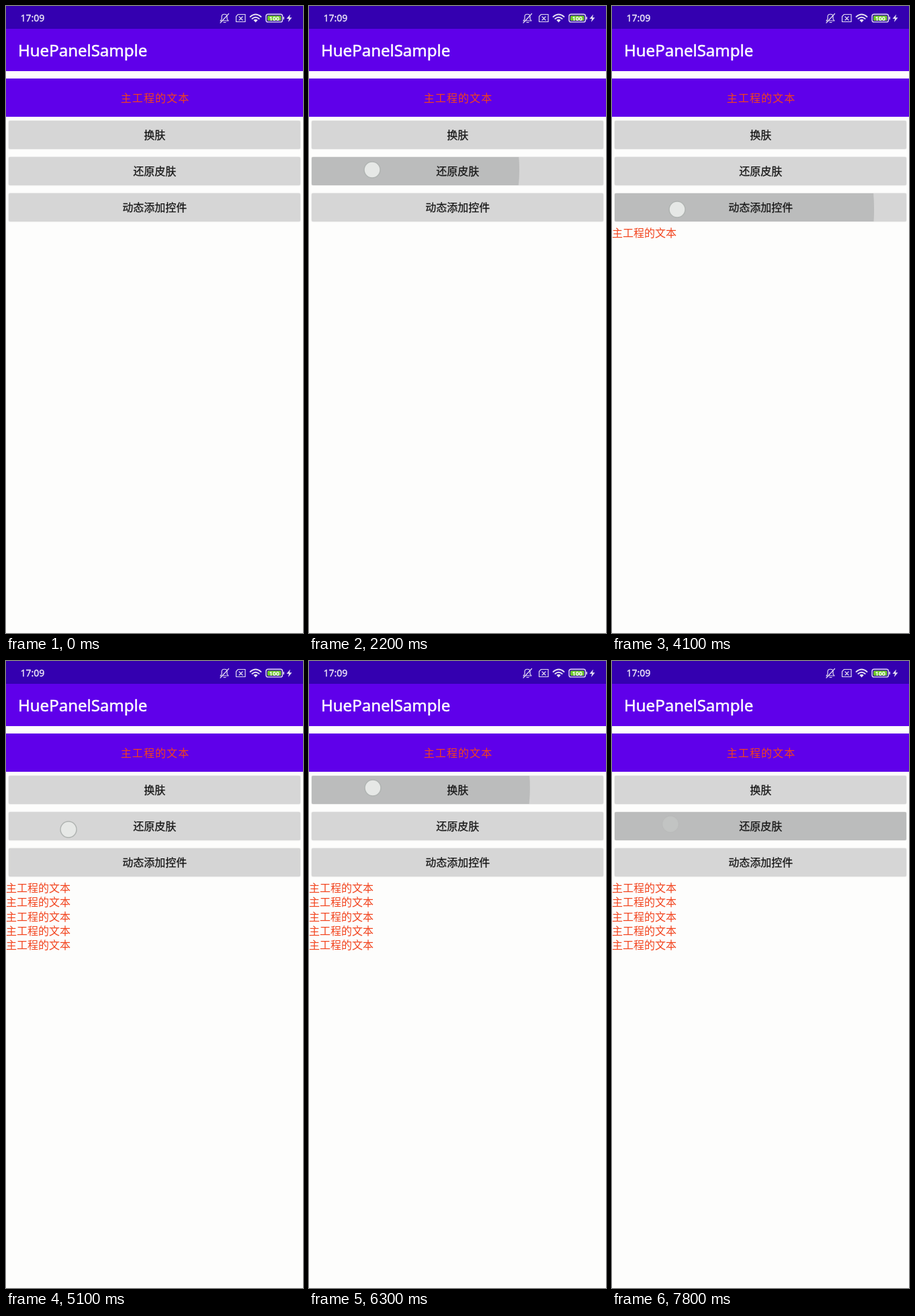
Animation, 442 px wide and 934 px high, one loop 7900 ms. Source, as an HTML page with a canvas:

```html
<!DOCTYPE html>
<html lang="zh-CN">
<head>
<meta charset="utf-8">
<style>
  html, body { margin: 0; width: 442px; height: 934px; overflow: hidden; }
  canvas { display: block; }
</style>
</head>
<body>
<canvas id="stage" width="442" height="934"></canvas>
<script>
const ctx = document.getElementById('stage').getContext('2d');
const LOOP = 7900;
const LATIN = '"Noto Sans", sans-serif';
const CJK = '"Noto Sans CJK SC", "Noto Sans CJK", sans-serif';
const PURPLE = '#5f00ea';
const ORANGE = '#f2421c';
const BUTTONS = ['换肤', '还原皮肤', '动态添加控件'];
const APPLY = 0, RESTORE = 1, ADD = 2;

// Taps: [press time, button, x, y]
const TAPS = [
  [1200, APPLY, 92, 191], [2053, RESTORE, 94, 244],
  [2496, APPLY, 92, 192], [2939, RESTORE, 90, 254],
  [3260, APPLY, 94, 191], [3580, RESTORE, 92, 248],
  [3903, ADD, 97, 303], [4110, ADD, 96, 303], [4317, ADD, 96, 302],
  [4524, ADD, 97, 302], [4730, ADD, 96, 303],
  [5095, RESTORE, 93, 251], [5445, APPLY, 94, 190], [5795, RESTORE, 92, 247],
  [6143, APPLY, 95, 189], [6615, RESTORE, 92, 246],
  [7087, APPLY, 93, 190], [7560, RESTORE, 87, 243]
];

const clamp = v => Math.max(0, Math.min(1, v));
const actionDelay = button => button === APPLY ? 210 : 140;

function rect(color, x, y, w, h) {
  ctx.fillStyle = color;
  ctx.fillRect(x, y, w, h);
}

// A thin outline of the same colour gives a medium weight.
function label(str, x, y, font, color, { align = 'left', spacing = 0, outline = 0 } = {}) {
  ctx.font = font;
  ctx.fillStyle = ctx.strokeStyle = color;
  ctx.textAlign = align;
  ctx.letterSpacing = spacing + 'px';
  ctx.fillText(str, x, y);
  if (outline) {
    ctx.lineWidth = outline;
    ctx.strokeText(str, x, y);
  }
}

function roundBox(x, y, w, h, r) {
  ctx.beginPath();
  ctx.roundRect(x, y, w, h, r);
}

function stroke(path, width = 1.2) {
  ctx.lineWidth = width;
  ctx.stroke(new Path2D(path));
}

function statusBar() {
  rect('#3400b0', 0, 0, 442, 34);
  label('17:09', 21.5, 23, '14px ' + LATIN, '#f4f0fa', { outline: 0.3 });
  ctx.strokeStyle = ctx.fillStyle = '#e4def2';
  ctx.lineCap = ctx.lineJoin = 'round';
  // Muted bell
  stroke('M319 22 H331 L329 19.5 V16 C329 11 321 11 321 16 V19.5 Z M324 24.5 H327 M331.5 11.5 L319 25');
  // Missing SIM
  stroke('M345.5 12.5 H356 V23.5 H342.5 V15.5 Z M347 16 L352 21 M352 16 L347 21');
  // Wi-Fi
  stroke('M363.5 16 Q371.5 9 379.5 16 M366.3 19 Q371.5 14.5 376.7 19', 1.9);
  ctx.fill(new Path2D('M368.3 21 Q371.5 18.4 374.7 21 L371.5 24.5 Z'));
  // Battery
  roundBox(387, 12.3, 24.5, 11.6, 3);
  ctx.lineWidth = 1.4;
  ctx.stroke();
  rect('#e4def2', 412.5, 16, 1.5, 4);
  ctx.fillStyle = '#6cc52a';
  roundBox(389, 14.2, 20.5, 7.8, 1.5);
  ctx.fill();
  label('100', 399.3, 21.6, '700 9px ' + LATIN, '#fff', { align: 'center' });
  ctx.fillStyle = '#e4def2';
  ctx.fill(new Path2D('M423 12.5 L417.5 19 H421 L420 24 L425.5 17.2 H422 Z'));
}

function button(index, t) {
  const y = 171 + index * 54;
  ctx.save();
  ctx.shadowColor = '#0003';
  ctx.shadowBlur = 2;
  ctx.fillStyle = '#d6d6d6';
  roundBox(4, y, 434, 42, 2);
  ctx.fill();
  ctx.restore();

  ctx.save();
  ctx.clip();
  ctx.fillStyle = '#bbbcbc';
  for (const [start, target, x, touchY] of TAPS) {
    const age = t - start;
    if (target !== index || age < 0 || age > 380) continue;
    ctx.globalAlpha = 1 - clamp((age - 240) / 140);
    ctx.beginPath();
    ctx.arc(x, touchY, age * 1.48, 0, 7);
    ctx.fill();
  }
  ctx.restore();
  label(BUTTONS[index], 221.3, y + 27, '500 16px ' + CJK, '#161616', { align: 'center', outline: 0.25 });
}

function touchDot([start, , x, y], t) {
  const age = t - start;
  if (age < 0 || age > 260) return;
  ctx.globalAlpha = 1 - clamp((age - 200) / 50);
  ctx.beginPath();
  ctx.arc(x, y, 12, 0, 7);
  ctx.fillStyle = '#e6e8e6';
  ctx.fill();
  ctx.strokeStyle = '#b0b4b2';
  ctx.lineWidth = 1.5;
  ctx.stroke();
  ctx.globalAlpha = 1;
}

function draw(t) {
  const done = TAPS.filter(([start, target]) => t >= start + actionDelay(target));
  const skinTap = done.filter(tap => tap[1] !== ADD).pop();
  const text = skinTap && skinTap[1] === APPLY ? '皮肤包的文本' : '主工程的文本';
  const added = done.filter(tap => tap[1] === ADD).length;

  rect('#fdfdfc', 0, 0, 442, 934);
  statusBar();
  rect(PURPLE, 0, 34, 442, 63);
  label('HuePanelSample', 18, 74.5, '24px ' + LATIN, '#fff', { outline: 0.5 });
  rect(PURPLE, 0, 108, 442, 57);
  label(text, 222, 143, '16px ' + CJK, ORANGE, { align: 'center', spacing: 1.1 });
  for (let i = 0; i < BUTTONS.length; i++) button(i, t);
  for (let i = 0; i < added; i++) {
    label(text, 0, 344 + i * 21.3, '16px ' + CJK, ORANGE);
  }
  TAPS.forEach(tap => touchDot(tap, t));
}

function tick() {
  draw(performance.now() % LOOP);
  requestAnimationFrame(tick);
}
tick();
</script>
</body>
</html>
```
